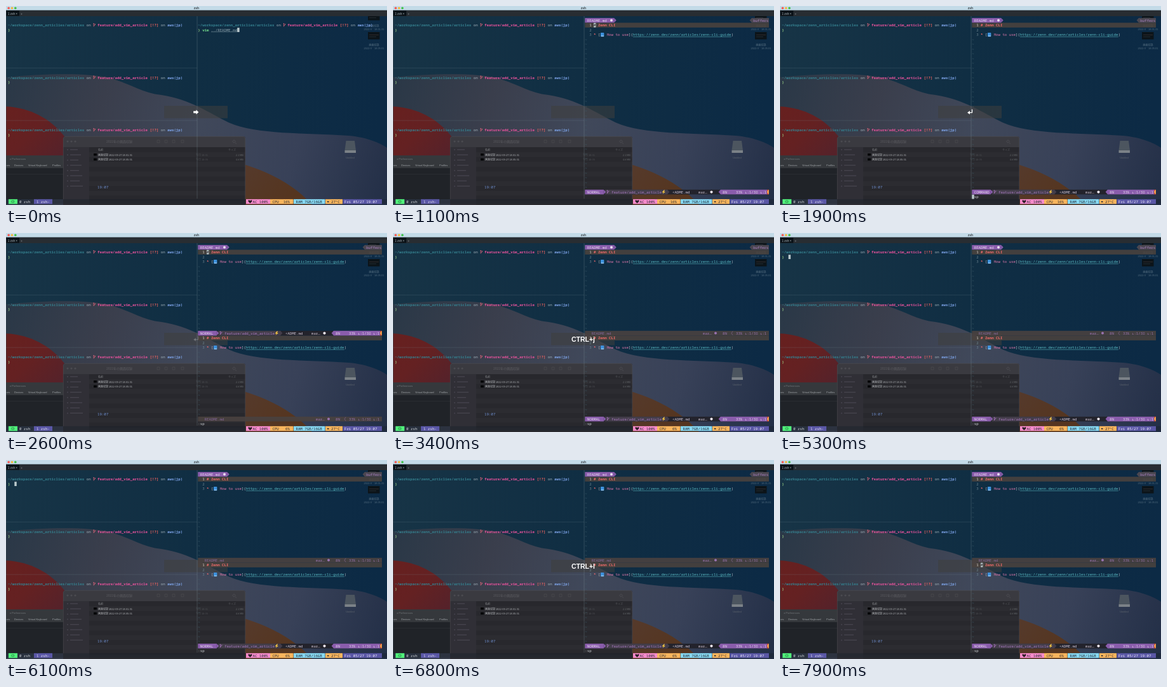
An HTML page with a canvas that plays this animation: 600 by 313 pixels, repeating every 8000 ms.

```html
<!DOCTYPE html>
<html lang="en">
<head>
<meta charset="utf-8">
<title>Terminal</title>
<style>
  html, body { margin: 0; width: 100%; height: 100%; overflow: hidden; background: #0d2b3f; }
  canvas { display: block; width: 600px; height: 313px; }
</style>
</head>
<body>
<canvas id="stage"></canvas>
<script>
const W = 600, H = 313, LOOP = 8000;
const CW = 3.44, ROW = 7.5, RIGHT = 87, EDGE = 592;
const MONO = '"Noto Sans Mono", "DejaVu Sans Mono", monospace';
const SANS = '"Liberation Sans", Arial, sans-serif';
const CJK = '"Noto Sans CJK JP", "Noto Sans CJK", sans-serif';
const PURPLE = '#8a5dac', LILAC = '#e8d8f0';

// Moments at which the state changes, in ms.
const OPEN = 500, COLON = 1250, SPLIT = 2000, DOWN = 3350, LEFT = 4400, BACK = 6650;

const canvas = document.getElementById('stage');
const dpr = window.devicePixelRatio || 1;
canvas.width = W * dpr;
canvas.height = H * dpr;
let g = canvas.getContext('2d');

const colX = c => 3 + c * CW;
const rowY = r => 22.6 + r * ROW;

function rect(x, y, w, h, fill) {
  g.fillStyle = fill;
  g.fillRect(x, y, w, h);
}

function round(x, y, w, h, r, fill) {
  g.fillStyle = fill;
  g.beginPath();
  g.roundRect(x, y, w, h, r);
  g.fill();
}

function disc(x, y, r, fill) {
  g.fillStyle = fill;
  g.beginPath();
  g.arc(x, y, r, 0, 7);
  g.fill();
}

function shape(path, fill) {
  g.fillStyle = fill;
  g.fill(new Path2D(path));
}

function line(path, color, width = 0.6) {
  g.strokeStyle = color;
  g.lineWidth = width;
  g.stroke(new Path2D(path));
}

function text(s, x, y, fill, font = '5.73px ' + MONO, align = 'left') {
  g.font = font;
  g.textAlign = align;
  g.textBaseline = 'alphabetic';
  g.fillStyle = fill;
  g.fillText(s, x, y + 2);
}

function cells(s, col, row, fill, bold) {
  text(s, colX(col), rowY(row), fill, (bold ? 'bold ' : '') + '5.73px ' + MONO);
}

// Runs of [string, colour, bold] placed one after the other on the character grid.
function runs(col, row, parts) {
  for (const [s, fill, bold] of parts) {
    cells(s, col, row, fill, bold);
    col += s.length;
  }
}

function block(x, row, w, fill) {
  rect(x, rowY(row) - ROW / 2, w, ROW, fill);
}

function gradient(x0, y0, x1, y1, ...colors) {
  const grad = g.createLinearGradient(x0, y0, x1, y1);
  colors.forEach((c, i) => grad.addColorStop(i / (colors.length - 1), c));
  return grad;
}

function wallpaper() {
  rect(0, 0, W, H, gradient(0, 0, W, 60, '#173446', '#102e43', '#0c2a45'));
  // pale wave below the blue
  shape('M0 112C60 106 130 105 163 113C200 124 215 137 245 140C290 147 320 168 350 183C395 203 470 199 540 204C570 207 588 215 600 223V313H0Z',
    gradient(0, 110, W, 300, '#2a3847', '#3a3e4c', '#40485a', '#384158', '#232f47'));
  // red wedge on the left
  shape('M0 158C38 160 70 177 92 205V240H0Z',
    gradient(0, 160, 80, 240, '#67201f', '#642122', '#55222a'));
  // orange dune
  shape('M320 238C380 245 445 270 482 313H320Z', gradient(370, 250, 440, 313, '#553a2c', '#55351f'));
}

function settingsWindow() {
  rect(0, 235, 90, 69, '#202328');
  rect(0, 235, 90, 20, '#35383c');
  text('e Preferences', 6, 239.5, '#777b7e', '4px ' + SANS);
  ['ces', 'Devices', 'Virtual Keyboard', 'Profiles'].forEach((s, i) =>
    text(s, [0, 13, 35, 73][i], 249.5, '#a1a5a8', '4px ' + SANS));
  rect(0, 264, 90, 0.6, '#303338');
}

function fileWindow() {
  const w = 287;
  round(90, 205, w, 108, 4, '#28282d');
  for (let y = 230; y < H; y += 15.2) rect(131, y, w - 41, 7.6, '#2c2c31');
  rect(90, 221, 41, 92, '#302f36');
  round(90, 205, w, 17, [4, 4, 0, 0], '#3a3a40');
  line('M94 205.3H373C375 205.3 376.7 207 376.7 209V304M90.3 304V209C90.3 207 92 205.3 94 205.3', '#505056', 0.5);
  [97, 103, 109].forEach(x => disc(x, 213, 1.6, '#4b4b50'));
  text('2022年の画面収録', 158, 213, '#5b5b60', '5px ' + CJK);
  [240, 252, 264, 278].forEach(x => line(`M${x - 2} 211H${x + 2}V215H${x - 2}Z`, '#4d4d52', 0.6));
  line('M359 211a2 2 0 1 0 .1 0M361 215l2 2', '#57575c', 0.6);
  for (let i = 0; i < 8; i++) {
    disc(97, 226 + i * 8.2, 1, '#46444f');
    rect(101, 225.2 + i * 8.2, 12 + (i * 5) % 9, 1.4, '#45434c');
  }
  text('名前', 145, 226, '#8b8d90', '4px ' + CJK);
  text('サイズ', 350, 226, '#55575b', '4px ' + CJK);
  ['18.01.31', '18.05.01'].forEach((s, i) => {
    const y = 233.7 + i * 7.6;
    rect(138, y - 1.8, 5, 3.6, '#050608');
    text('画面収録 2022-05-27 ' + s, 145, y, '#b2b5b8', '4px ' + CJK);
    text('今日 18:0' + (1 + i * 4), 299, y, '#4c4e52', '4px ' + CJK);
    text(['2.1', '4.6'][i] + ' MB', 374, y, '#65686b', '4px ' + CJK, 'right');
  });
}

function desktop() {
  wallpaper();
  settingsWindow();
  fileWindow();
  [[11, '18.01.31'], [41, '18.05.01']].forEach(([y, s]) => {
    rect(570, y, 18.5, 11.5, '#0c1419');
    rect(572, y + 4, 15, 0.6, '#453a38');
    rect(572, y + 7, 11, 0.6, '#33393e');
    text('画面収録', 579.5, y + 20, '#566f80', '4px ' + CJK, 'center');
    text('2022-0…' + s, 579.5, y + 24.5, '#566f80', '4px ' + CJK, 'center');
  });
  shape('M535.5 212H549L551 227H533.5Z', '#4c555f');
  rect(533.5, 227, 17.5, 4, '#7b8187');
  text('Untitled', 542, 238, '#5f656e', '4px ' + SANS, 'center');
  rect(249, 157, 100, 19.5, 'rgba(62,62,60,.55)');
}

function windowBar() {
  rect(0, 0, W, 6.8, '#c4dbe8');
  ['#f5554f', '#f5b93a', '#3ec146'].forEach((c, i) => disc(4.2 + i * 5.3, 3.3, 1.8, c));
  text('zsh', 300, 3, '#3b444a', 'bold 5px ' + SANS, 'center');
  rect(0, 6.8, W, 9.2, '#282d32');
  rect(0, 7.4, 21, 8.2, '#0a1117');
  text('1 zsh ×', 3, 12, '#b7c0c4', '4.6px ' + SANS);
  text('+', 23, 12, '#8c9498', '5px ' + SANS);
}

function branch(x, y, color) {
  line(`M${x} ${y - 2.3}V${y + 2.4}M${x} ${y + 1}Q${x + 2.2} ${y + .6} ${x + 2.2} ${y - 1.2}`, color, 0.7);
  disc(x, y - 2.3, 0.7, color);
  disc(x + 2.2, y - 1.5, 0.7, color);
}

function prompt(col, row) {
  const pink = '#e8529c', pale = '#a3b3bc';
  runs(col, row, [
    ['~/workspace/zenn_articlies/articles', '#35808f', true], [' on ', pale], ['  ', pink],
    ['feature/add_vim_article', pink, true], [' [!?]', '#f4635f', true], [' on ', pale],
    ['aws(jp)', '#7fa6ec', true]
  ]);
  branch(colX(col + 39) + 1, rowY(row), '#ef6a80');
  cells(')', col, row + 1, '#a5e08c', true);
}

function cursor(col, row, ch) {
  rect(colX(col), rowY(row) - 3.4, CW, 6.8, '#bccace');
  if (ch) cells(ch, col, row, '#3a3a3e', true);
}

function panes() {
  [1, 12, 23].forEach(r => prompt(0, r));
  [10, 21].forEach(r => line(`M0 ${rowY(r)}H301`, 'rgba(130,150,160,.3)', 0.6));
  line('M301 16V303', 'rgba(140,158,165,.4)', 0.7);
  cells('19:07', 41, 35, '#7395d8');
}

function tmuxBar(t) {
  const y = rowY(38), dark = '#262a35';
  block(0, 38, W, 'rgba(20,30,42,.35)');
  block(4, 38, 14, '#50f27a');
  line(`M9 ${y - 1.5}H12.5V${y + 1.5}H9Z`, '#1c5a35', 0.6);
  text('0 zsh', 21, y, '#d4d8dc');
  block(44, 38, 29, '#5a57a6');
  text('1 zsh-', 48, y, '#eceaf8');
  const cpu = t < 2600 ? ' 16%' : '  6%';
  const items = [
    [378, 38, '#f78bcb', 388.5, 'AC 100%'], [416, 36.5, '#f8b55d', 419.5, 'CPU ' + cpu],
    [453, 49.5, '#86d8f2', 456.5, 'RAM 7GB/16GB'], [503, 27, '#f8b55d', 512, '27°C'],
    [530.5, 61.5, '#5a57a6', 533, 'Fri 05/27 19:07']
  ];
  items.forEach(([x, w, bg, tx, s], i) => {
    block(x, 38, w, bg);
    text(s, tx, y, i === 4 ? '#f1eefc' : dark);
  });
  shape(`M384.5 ${y + 2.6}C379 ${y - 1} 382 ${y - 4} 384.5 ${y - 1.4}C387 ${y - 4} 390 ${y - 1} 384.5 ${y + 2.6}`, '#30202b');
  disc(507, y, 0.9, dark);
  rect(505.8, y, 3, 1, dark);
}

function arrow(x, row, dir, color) {
  const y = rowY(row), h = ROW / 2;
  shape(`M${x} ${y - h}L${x + dir * 3.4} ${y}L${x} ${y + h}Z`, color);
}

function position(row, color) {
  const y = rowY(row);
  text('8N', 519, y, color);
  text('33%', 540, y, color);
  text('ʟ:1/3≡', 554, y, color);
  text('ʟ:1', 578, y, color);
}

function buffer(top, end) {
  block(302.3, top, EDGE - 302.3, 'rgba(74,66,62,.88)');
  ['1', '2', '3'].forEach((n, i) => cells(n, RIGHT + 2, top + i, i ? '#6c8590' : '#e2e0d5'));
  cells('# Zenn CLI', RIGHT + 4, top, '#f56c6c', true);
  const row = top + 2, y = rowY(row), x = colX(RIGHT + 7);
  runs(RIGHT + 4, row, [['* ', '#f56c6c', true], ['[', '#b7c3cb']]);
  round(x + 0.6, y - 3, 5.4, 6.2, 0.8, '#3d91dc');
  rect(x + 1.6, y + 1.7, 4, 0.8, '#d8e8f2');
  const url = 'https://zenn.dev/zenn/articles/zenn-cli-guide';
  runs(RIGHT + 10, row, [['How to use', '#e078ac'], ['](', '#b7c3cb'], [url, '#5dc0c8'], [')', '#b7c3cb']]);
  rect(colX(RIGHT + 22), y + 3, url.length * CW, 0.5, '#5dc0c8');
  for (let r = top + 3; r < end; r++) cells('~', RIGHT, r, '#41616f');
}

function idleStatus(row) {
  const y = rowY(row), mauve = '#9a74b0';
  block(302.3, row, EDGE - 302.3, 'rgba(74,66,64,.9)');
  cells('README.md', RIGHT + 3, row, '#84679a');
  text('mar…', 488, y, mauve);
  disc(508, y, 2, mauve);
  position(row, mauve);
  line(`M535 ${y - 3}l-2 3l2 3`, mauve, 0.5);
}

function activeStatus(row, mode) {
  const y = rowY(row), grey = '#433d4a';
  block(302.3, row, EDGE - 302.3, '#23232c');
  block(334, row, 98, grey);
  arrow(432, row, 1, grey);
  block(302.3, row, 29.5, PURPLE);
  arrow(331.8, row, 1, PURPLE);
  cells(mode, RIGHT + 1, row, LILAC);
  branch(337.5, y, '#b67dcc');
  text('feature/add_vim_article', 344, y, '#a477bd');
  shape(`M426.5 ${y - 3}L423.5 ${y + .6}H426L424.5 ${y + 3.3}L429 ${y - .7}H426.5L428.3 ${y - 3}Z`, '#f5c443');
  text('<ADME.md', 440, y, '#d0c6d5');
  text('mar…', 481, y, '#d0c6d5');
  disc(501.5, y, 2.1, '#eee6f0');
  block(516, row, 73, PURPLE);
  arrow(516, row, -1, PURPLE);
  block(589, row, 3, '#c9503f');
  arrow(592, row, -1, '#f0a04c');
  position(row, LILAC);
}

function vim(t) {
  const command = t >= COLON && t < SPLIT;
  block(302.3, 0, 46, PURPLE);
  arrow(348.3, 0, 1, PURPLE);
  cells('README.md', RIGHT + 1, 0, LILAC);
  disc(344, rowY(0), 2, '#eadff0');
  block(565, 0, EDGE - 565, '#4a4650');
  arrow(565, 0, -1, '#4a4650');
  cells('buffers', RIGHT + 77, 0, '#a77fbf');

  if (t < SPLIT) {
    buffer(1, 36);
    activeStatus(36, command ? 'COMMAND' : 'NORMAL');
  } else {
    const below = t >= DOWN;
    buffer(1, 18);
    buffer(19, 36);
    idleStatus(below ? 18 : 36);
    activeStatus(below ? 36 : 18, 'NORMAL');
  }

  const typed = Math.max(0, Math.min(3, Math.floor((t - COLON) / 200) + 1));
  cells(':sp'.slice(0, typed), RIGHT, 37, '#d4dadd');
}

function shell() {
  prompt(RIGHT, 1);
  cells('vim', RIGHT + 2, 2, '#74db8d', true);
  const x = colX(RIGHT + 6), file = '../README.md';
  text(file, x, rowY(2), '#8da3ad');
  rect(x, rowY(2) + 3, file.length * CW, 0.5, '#8da3ad');
}

// The cursor is hidden briefly while the focus moves.
function focus(t) {
  const col = RIGHT + 4;
  if (t < OPEN) cursor(RIGHT + 18, 2);
  else if (t < COLON) cursor(col, 1, '#');
  else if (t < SPLIT) cursor(RIGHT, 37);
  else if (t < DOWN - 50) cursor(col, 1, '#');
  else if (t >= DOWN + 150 && t < LEFT) cursor(col, 19, '#');
  else if (t >= LEFT && t < BACK) cursor(3, 2);
  else if (t >= BACK + 200) cursor(col, 19, '#');
}

// [start, hold until, label]
const keys = [
  [0, 300, 'right'], [350, 750, 'enter'], [COLON, 1450, ':'], [1450, 1650, 's'], [1650, 1850, 'p'],
  [1850, 2400, 'enter'], [DOWN - 50, 3900, 'CTRL+j'], [LEFT - 50, 4950, 'CTRL+h'], [BACK - 50, 7200, 'CTRL+l']
];

function keyCaption(t) {
  const [, hold, label] = keys.findLast(([start]) => t >= start);
  const alpha = 1 - Math.max(0, t - hold) / 250;
  if (alpha <= 0) return;
  g.globalAlpha = alpha;
  if (label === 'right') {
    shape('M295.2 165.2H299.4V163.3L303.4 166.9L299.4 170.5V168.6H295.2Z', '#fff');
  } else if (label === 'enter') {
    line('M302.5 162.5V167.7H297', '#fff', 1.3);
    shape('M295 167.7L299 164.8V170.6Z', '#fff');
  } else {
    text(label, 299.5, 168.6, '#fff', 'bold 10.5px ' + SANS, 'center');
  }
  g.globalAlpha = 1;
}

// The still desktop is painted once and reused.
const still = document.createElement('canvas');
still.width = canvas.width;
still.height = canvas.height;
const view = g;
g = still.getContext('2d');
g.scale(dpr, dpr);
desktop();
windowBar();
line('M0.3 7V313', '#3d4a52', 0.6);
g = view;

function draw(t) {
  g.setTransform(dpr, 0, 0, dpr, 0, 0);
  g.drawImage(still, 0, 0, W, H);
  panes();
  if (t < OPEN) shell(); else vim(t);
  focus(t);
  tmuxBar(t);
  keyCaption(t);
}

const begin = performance.now();
function tick() {
  draw((performance.now() - begin) % LOOP);
  requestAnimationFrame(tick);
}
tick();
</script>
</body>
</html>
```
